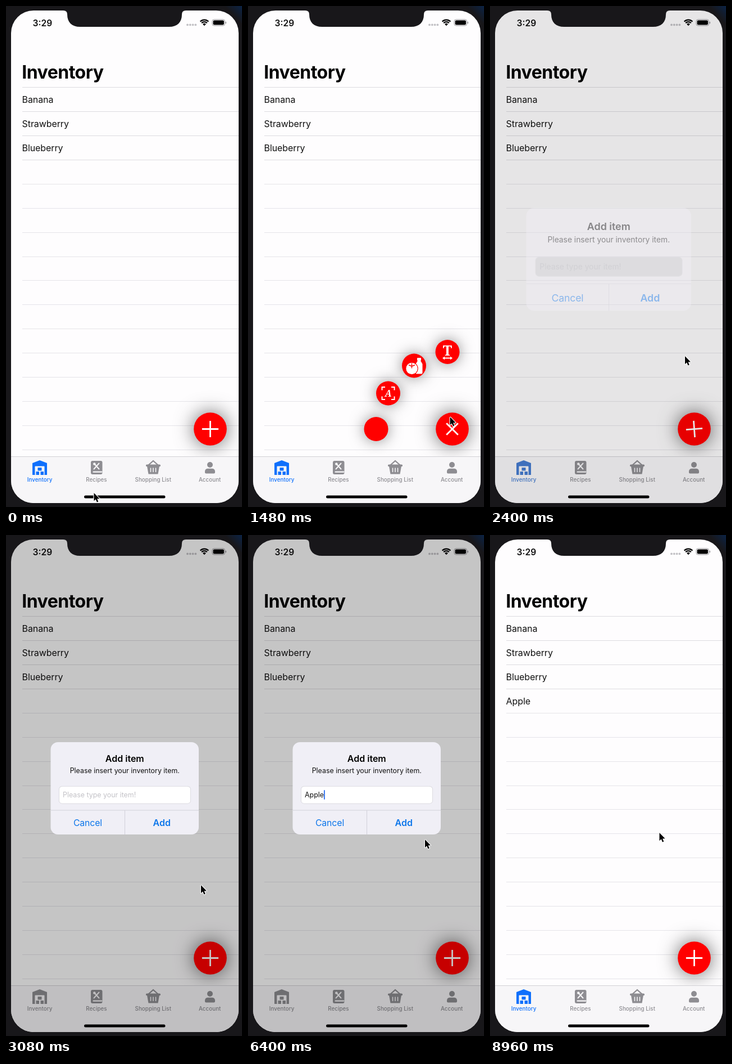
Recreate the animation shown at these times as an HTML page with a canvas. Size 420 by 890 pixels, loop 9360 ms.

```html
<!DOCTYPE html>
<html lang="en">
<head>
<meta charset="utf-8">
<title>Inventory</title>
<style>
html, body { margin: 0; width: 100%; height: 100%; overflow: hidden; background: #18171a; }
canvas { display: block; width: 420px; height: 890px; }
</style>
</head>
<body>
<canvas id="stage" width="420" height="890"></canvas>
<script>
const ctx = document.getElementById('stage').getContext('2d');
const LOOP = 9360;
const SANS = 'Inter, "Open Sans", sans-serif';
const SERIF = '"Noto Serif", serif';
const RED = '#ff0000', GRAY = [142, 141, 146], BLUE = [15, 112, 252];
const ROW = 42.93, FIRST = 144.5;
const FAB = { x: 363.5, y: 751.5, r: 29.3 };
const OPEN = 2280, CLOSE = 6720;
const KEYS = [3760, 4640, 4800, 4960, 5160];
// start, end, x, y
const MOVES = [
  [40, 720, 362.5, 757],
  [1320, 1860, 348, 625],
  [1880, 2000, 347, 622],
  [5760, 6360, 315, 541],
  [6400, 6620, 301.5, 529]
];

const ramp = (t, a, b) => Math.min(1, Math.max(0, (t - a) / (b - a)));
const ease = (t, a, b) => 0.5 - 0.5 * Math.cos(Math.PI * ramp(t, a, b));
const mix = (a, b, k) => a + (b - a) * k;
const blend = (a, b, k) => `rgb(${a.map((v, i) => Math.round(mix(v, b[i], k))).join(',')})`;
function settle(t, start) {
  const x = Math.max(0, t - start) * 0.012;
  return 1 - (1 + x) * Math.exp(-x);
}

function text(str, x, y, size, color, { weight = 400, align = 'left', gap = 0, family = SANS, style = '' } = {}) {
  ctx.font = `${style} ${weight} ${size}px ${family}`;
  ctx.letterSpacing = gap + 'px';
  ctx.textAlign = align;
  ctx.fillStyle = color;
  ctx.fillText(str, x, y);
}
function rect(x, y, w, h, color, r = 0) {
  ctx.fillStyle = color;
  ctx.beginPath();
  ctx.roundRect(x, y, w, h, r);
  ctx.fill();
}
function disc(x, y, r, color) {
  ctx.fillStyle = color;
  ctx.beginPath();
  ctx.arc(x, y, r, 0, 7);
  ctx.fill();
}
function poly(points, color) {
  ctx.fillStyle = color;
  ctx.beginPath();
  points.forEach(p => ctx.lineTo(...p));
  ctx.closePath();
  ctx.fill();
}
function line(points, color, width, cap = 'butt') {
  ctx.strokeStyle = color;
  ctx.lineWidth = width;
  ctx.lineCap = cap;
  ctx.beginPath();
  points.forEach(p => ctx.lineTo(...p));
  ctx.stroke();
}
function at(x, y, draw, scale = 1, turn = 0) {
  ctx.save();
  ctx.translate(x, y);
  ctx.rotate(turn);
  ctx.scale(scale, scale);
  draw();
  ctx.restore();
}
function shadowDisc(x, y, r, blur, alpha) {
  ctx.save();
  ctx.shadowColor = `rgba(0,0,0,${alpha})`;
  ctx.shadowBlur = blur;
  disc(x, y, r, RED);
  ctx.restore();
}

function drawBezel() {
  rect(0, 0, 420, 890, '#18171a');
  const glow = ctx.createLinearGradient(396, 22, 420, 0);
  glow.addColorStop(0.3, '#18171a');
  glow.addColorStop(1, '#0b2346');
  rect(380, 0, 40, 30, glow);
}

function drawList(t) {
  rect(0, 0, 420, 890, '#fefdfe');
  text('Inventory', 28.2, 129, 32, '#000', { weight: 700, gap: -0.5 });
  for (let i = 0; i < 16; i++)
    rect(29, Math.round(FIRST + i * ROW - 0.5), 391, 1, i < 4 ? '#dddce0' : '#e5e4e9');
  const row = (name, i) => text(name, 28.6, FIRST + i * ROW + 27.6, 16, '#111', { gap: -0.1 });
  ['Banana', 'Strawberry', 'Blueberry'].forEach(row);
  ctx.globalAlpha = ease(t, 7160, 7460);
  row('Apple', 3);
  ctx.globalAlpha = 1;
}

function drawStatus() {
  text('3:29', 47.6, 35.5, 15.6, '#111', { weight: 600 });
  for (let i = 0; i < 4; i++) disc(323 + i * 4.8, 33.4, 1.9, '#c2c1c5');
  ctx.strokeStyle = '#000';
  ctx.lineCap = 'butt';
  ctx.lineWidth = 2.3;
  for (const r of [10.4, 6.8]) {
    ctx.beginPath();
    ctx.arc(353, 35, r, -Math.PI * 0.75, -Math.PI * 0.25);
    ctx.stroke();
  }
  ctx.fillStyle = '#000';
  ctx.beginPath();
  ctx.moveTo(353, 35.2);
  ctx.arc(353, 35, 4, -Math.PI * 0.75, -Math.PI * 0.25);
  ctx.fill();
  ctx.strokeStyle = '#9b9a9e';
  ctx.lineWidth = 1;
  ctx.beginPath();
  ctx.roundRect(367, 24, 22.5, 11, 3.2);
  ctx.stroke();
  rect(368.6, 25.6, 19.3, 7.8, '#000', 2);
  rect(390.6, 27.7, 1.5, 3.8, '#9b9a9e', 1);
}

function drawTabs(tint) {
  const bg = '#f7f6f8', gray = blend(GRAY, GRAY, 0);
  rect(0, 801, 420, 89, bg);
  rect(0, 800, 420, 1, '#d2d1d5');

  poly([[47, 833], [47, 812], [60, 807], [73, 812], [73, 833]], tint);
  rect(51.5, 817.5, 17, 15.5, bg, 1);
  rect(56.5, 820, 7, 5.5, tint);
  rect(53.5, 827, 5.5, 6, tint);
  rect(61.5, 827, 5.5, 6, tint);

  rect(151, 808, 20.5, 24, gray, 3);
  rect(154.5, 826.5, 17, 2.2, bg, 1);
  line([[156.5, 822.5], [165.5, 812.5]], bg, 2, 'round');
  line([[157, 813], [165.5, 822.5]], bg, 2, 'round');
  disc(157.3, 813.5, 2.3, bg);

  line([[253.5, 815.5], [262, 808], [270.5, 815.5]], gray, 2.2);
  rect(249, 814.5, 26, 3.6, gray, 1.5);
  poly([[251, 817.5], [273, 817.5], [270.5, 831.5], [253.5, 831.5]], gray);
  for (const x of [257.5, 262, 266.5]) line([[x, 821], [x, 827.5]], bg, 1.6, 'round');

  disc(363, 815, 5, gray);
  rect(354, 821.8, 18, 8.6, gray, [5, 5, 2, 2]);

  ['Inventory', 'Recipes', 'Shopping List', 'Account'].forEach((name, i) =>
    text(name, 60 + i * 100.9, 845.4, 9.8, i ? gray : tint, { weight: 500, align: 'center', gap: 0.05 }));
}

function iconText() {
  text('T', 0, 6, 25, '#fff', { weight: 700, align: 'center', family: SERIF });
  line([[-7, 11], [7, 11]], '#fff', 1.8);
  for (const s of [-1, 1]) poly([[s * 9, 11], [s * 5, 8], [s * 5, 14]], '#fff');
}
function iconFood() {
  rect(5.5, -14, 7, 5, '#fff', 1);
  poly([[6.5, -9], [11.5, -9], [15, -3], [15, 13], [14, 14.5], [4, 14.5], [3, 13], [3, -3]], '#fff');
  disc(-4, 5, 11.3, RED);
  disc(-4, 5, 10.2, '#fff');
  line([[-9, -1], [-4, 1], [1, -1]], RED, 1.4, 'round');
  line([[-4, -4], [-4, 4]], RED, 1.4, 'round');
}
function iconScan() {
  for (const sx of [-1, 1])
    for (const sy of [-1, 1])
      line([[sx * 11, sy * 5.5], [sx * 11, sy * 11], [sx * 5.5, sy * 11]], '#fff', 2);
  text('A', 0, 5.8, 16, '#fff', { weight: 700, align: 'center', family: SERIF, style: 'italic' });
}
const ITEMS = [
  [-135.5, 0, null],
  [-114, -63.5, iconScan],
  [-68, -112.5, iconFood],
  [-8.5, -137, iconText]
];

function drawMenu(m) {
  if (m > 0) {
    const scale = 0.1 + 0.9 * m;
    for (const [dx, dy, icon] of ITEMS) {
      const x = FAB.x + dx * m, y = FAB.y + dy * m;
      shadowDisc(x, y, 21.5 * scale, 26 * scale, 0.45);
      if (icon) at(x, y, icon, scale);
    }
  }
  shadowDisc(FAB.x, FAB.y, FAB.r, 34, 0.6);
  at(FAB.x, FAB.y, () => {
    line([[-14.6, 0], [14.6, 0]], '#fff', 2.8);
    line([[0, -14.6], [0, 14.6]], '#fff', 2.8);
  }, 1, -Math.PI / 4 * m);
}

function drawAlert(t, a) {
  if (a < 0.004) return;
  const blue = '#0c76ea', rule = '#d2d1d9', size = 12.4;
  const typed = 'Apple'.slice(0, KEYS.filter(k => k <= t).length);
  const solid = ramp(a, 0.45, 1);
  ctx.save();
  ctx.globalAlpha = a;
  ctx.translate(211.3, 450);
  const scale = t < CLOSE ? 1.2 - 0.2 * a : 1;
  ctx.scale(scale, scale);
  ctx.translate(-211.3, -450);

  rect(79.5, 368, 263.5, 164, '#f0eff6', 13);
  text('Add item', 211.3, 403, 16, '#000', { weight: 600, align: 'center' });
  text('Please insert your inventory item.', 211.3, 422.7, size, '#111', { align: 'center' });
  rect(94, 446, 235, 31.5, blend([213, 212, 216], [213, 212, 218], solid), 6);
  rect(94.8, 446.8, 233.4, 29.9, blend([213, 212, 216], [255, 255, 255], solid), 5.3);
  if (typed) text(typed, 101, 466, size, '#111');
  else text('Please type your item!', 101, 466, size, '#c3c2c7');

  const caret = ramp(t, 2400, 2500) - ramp(t, 2840, 3060) + ramp(t, 3420, 3520)
    - ramp(t, 3900, 4040) + ramp(t, 4180, 4440) - ramp(t, 5660, 5800)
    + ramp(t, 6080, 6200) - ramp(t, CLOSE, CLOSE + 40);
  ctx.globalAlpha = a * Math.max(0, caret);
  const width = typed ? ctx.measureText(typed).width : 0.5;
  rect(101 + width, 453, 2, 17, '#3a78f0', 1);
  ctx.globalAlpha = a;

  rect(79.5, 488.5, 263.5, 1, rule);
  rect(211, 489, 1, 43, rule);
  text('Cancel', 145.5, 517, 15.8, blue, { align: 'center', gap: -0.1 });
  text('Add', 277.3, 517, 16, blue, { weight: 600, align: 'center' });
  ctx.restore();
}

function drawPointer(t) {
  let x = 156.5, y = 865;
  for (const [start, end, nx, ny] of MOVES) {
    const k = ease(t, start, end);
    x = mix(x, nx, k);
    y = mix(y, ny, k);
  }
  at(x, y, () => {
    const arrow = [[0, 0], [0, 14.2], [3.2, 11.3], [5.4, 16.4], [7.8, 15.4], [5.6, 10.4], [10, 10.2]];
    ctx.lineJoin = 'round';
    line([...arrow, arrow[0]], '#fff', 2.2);
    poly(arrow, '#000');
    ctx.lineJoin = 'miter';
  });
}

function drawNotch() {
  ctx.fillStyle = '#18171a';
  ctx.beginPath();
  ctx.moveTo(102, 7);
  ctx.lineTo(102, 8);
  ctx.quadraticCurveTo(109, 8, 109, 15);
  ctx.bezierCurveTo(109, 29, 117, 37, 132, 37);
  ctx.lineTo(290, 37);
  ctx.bezierCurveTo(305, 37, 313, 29, 313, 15);
  ctx.quadraticCurveTo(313, 8, 320, 8);
  ctx.lineTo(320, 7);
  ctx.fill();
}

function draw(t) {
  const alert = t < CLOSE ? settle(t, OPEN) : 1 - settle(t, CLOSE);
  const menu = ease(t, 1040, 1440) - ease(t, 2080, 2480);
  drawBezel();
  ctx.save();
  ctx.beginPath();
  ctx.roundRect(9, 8, 405, 875, 40);
  ctx.clip();
  drawList(t);
  drawStatus();
  drawMenu(menu);
  drawTabs(blend(BLUE, GRAY, alert));
  rect(0, 0, 420, 890, `rgba(0,0,0,${0.225 * alert})`);
  rect(139, 869.5, 144.5, 5, '#000', 2.5);
  drawAlert(t, alert);
  ctx.restore();
  drawNotch();
  drawPointer(t);
}

const begin = performance.now();
function tick() {
  draw((performance.now() - begin) % LOOP);
  requestAnimationFrame(tick);
}
tick();
</script>
</body>
</html>
```
